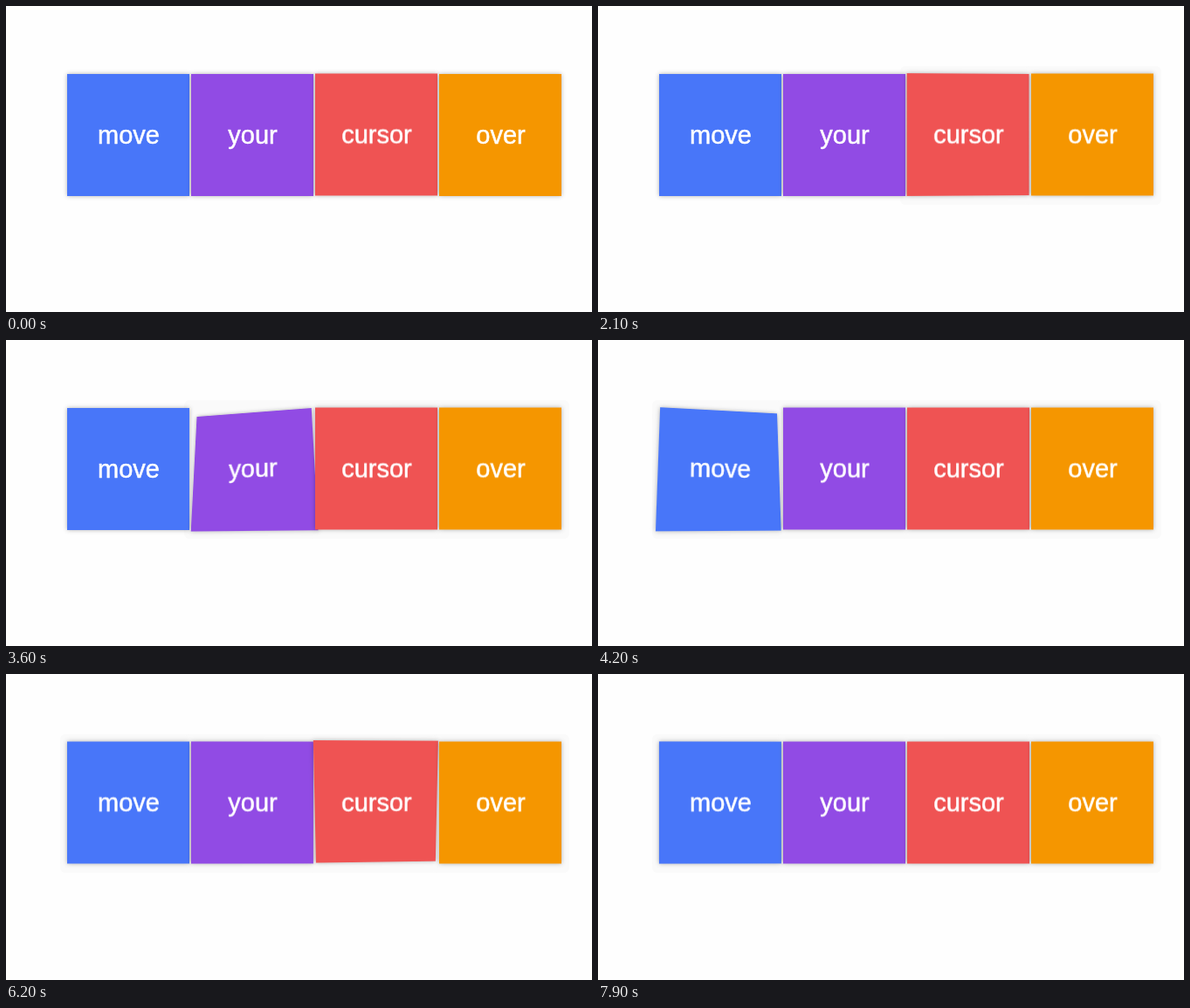
An HTML page that plays this animation: 671x351 px, repeating every 8 s.

```html
<!DOCTYPE html>
<html lang="en">
<head>
<meta charset="utf-8">
<title>Tilting tiles</title>
<style>
  html, body { margin: 0; width: 100%; height: 100%; overflow: hidden; background: #fefefe; }
  .halo, .tile { position: absolute; }
  .halo { top: 69px; width: 157px; height: 159px; border-radius: 6px; background: #fafafa; }
  .tile {
    top: 78px; width: 140px; height: 140px; z-index: 1;
    box-shadow: 0 0 5px rgba(0, 0, 0, .3);
    color: #fff; text-align: center; text-indent: 1px;
    font: 29px/140px "Liberation Sans", Arial, sans-serif;
    -webkit-text-stroke: .5px #fff;
  }
</style>
</head>
<body>
<script>
const LOOP = 8000, STEP = 100;
const HALF = 70, PITCH = 142, MIDDLE = 148;
const DEPTH = 340, MAX_TILT = 18, FOLLOW = .6;

// Stops of an unseen cursor: [time, x, y]
const path = [
  [0, 760, 148], [200, 600, 148], [800, 531, 146], [1200, 531, 146],
  [1700, 434, 148], [2800, 422, 146], [3000, 330, 110], [3600, 233, 88],
  [3700, 205, 100], [4900, 116, 126], [5200, 240, 146], [5600, 282, 148],
  [6200, 450, 175], [6800, 570, 150], [7000, 570, 148], [7400, 190, 148],
  [7700, 140, 148], [LOOP, 140, 148]
];

const tiles = [
  { word: "move", color: "#4876f9" },
  { word: "your", color: "#914be4" },
  { word: "cursor", color: "#ef5353", raised: true },
  { word: "over", color: "#f59600" }
];

function addBox(className, left) {
  const box = document.createElement("div");
  box.className = className;
  box.style.left = left + "px";
  return document.body.appendChild(box);
}

tiles.forEach((tile, i) => {
  tile.center = 140 + i * PITCH;
  tile.halo = addBox("halo", tile.center - 78);
  tile.box = addBox("tile", tile.center - HALF);
  tile.box.textContent = tile.word;
  tile.box.style.background = tile.color;
});

function cursorAt(time) {
  const next = Math.max(1, path.findIndex(stop => stop[0] >= time));
  const [t0, x0, y0] = path[next - 1], [t1, x1, y1] = path[next];
  const k = (time - t0) / (t1 - t0);
  return [x0 + (x1 - x0) * k, y0 + (y1 - y0) * k];
}

// The tilt chases the cursor while it is over the tile, and level otherwise.
function poseAt(center, time) {
  let rx = 0, ry = 0, touched = false;
  for (let t = 0; t <= time; t += STEP) {
    const [x, y] = cursorAt(t);
    const dx = (x - center) / HALF, dy = (y - MIDDLE) / HALF;
    const over = Math.abs(dx) <= 1 && Math.abs(dy) <= 1;
    rx += ((over ? -dy * MAX_TILT : 0) - rx) * FOLLOW;
    ry += ((over ? dx * MAX_TILT : 0) - ry) * FOLLOW;
    touched ||= over;
  }
  return { rx, ry, touched };
}

function draw(time) {
  for (const { box, halo, center, raised } of tiles) {
    const { rx, ry, touched } = poseAt(center, time);
    box.style.transform = touched || raised
      ? `translateY(-.5px) perspective(${DEPTH}px) rotateX(${rx}deg) rotateY(${ry}deg)`
      : "none";
    halo.style.visibility = touched ? "visible" : "hidden";
  }
}

const start = performance.now();
function tick() {
  const elapsed = (performance.now() - start) % LOOP;
  draw(Math.floor(elapsed / STEP) * STEP);
  requestAnimationFrame(tick);
}
tick();
</script>
</body>
</html>
```
